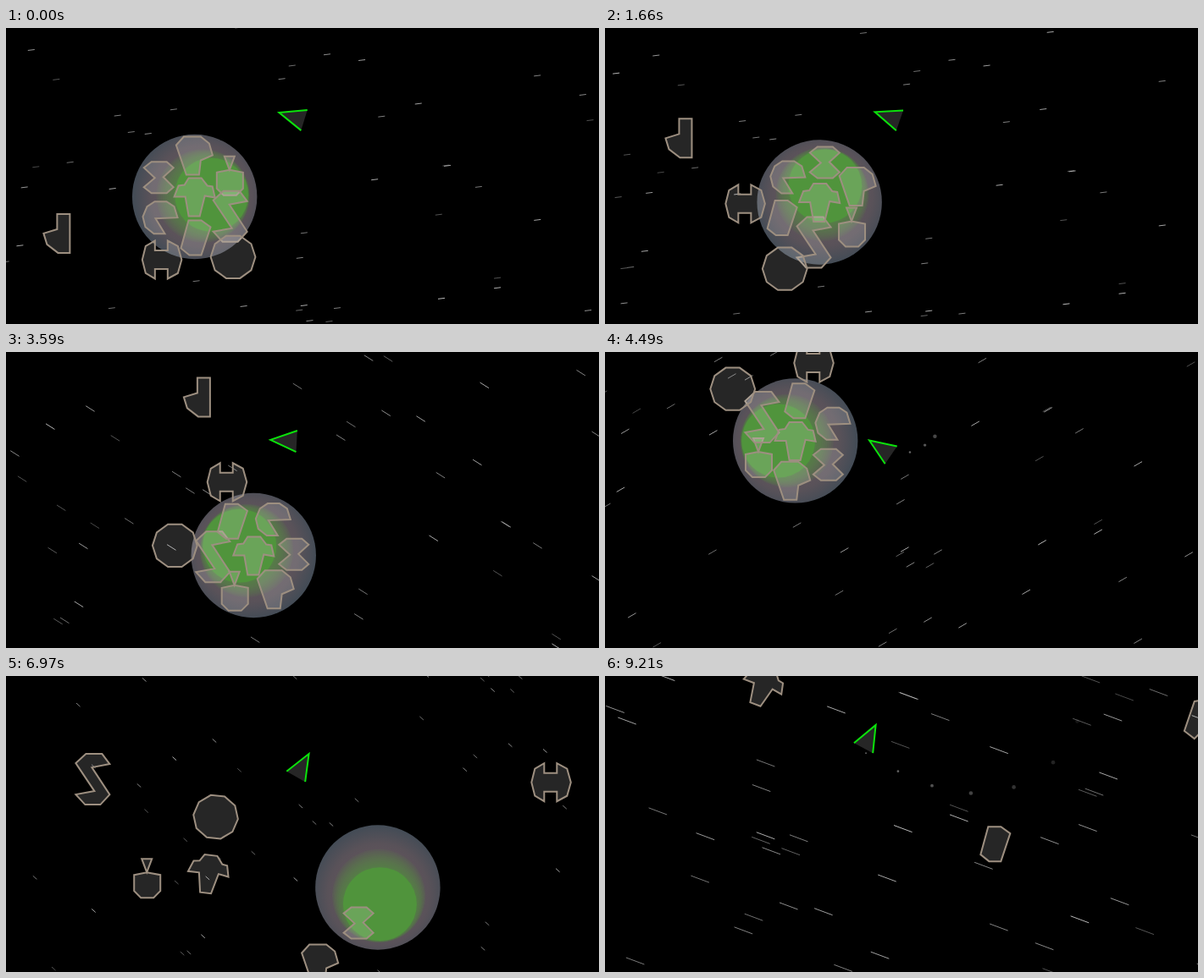
Recreate the animation shown at these times as an HTML page. Size 700 px wide and 350 px high, loop 9.24 s.

```html
<!DOCTYPE html>
<html lang="en">
<head>
<meta charset="utf-8">
<title>Space drift</title>
<style>
  html, body { margin: 0; width: 100%; height: 100%; overflow: hidden; background: #000; }
  svg { display: block; width: 700px; height: 350px; background: #000; }
</style>
</head>
<body>
<svg id="stage" viewBox="0 0 700 350">
  <defs>
    <radialGradient id="shell" gradientUnits="userSpaceOnUse" cx="0" cy="0" r="80">
      <stop offset=".5" stop-color="#62545c"/>
      <stop offset=".75" stop-color="#595259"/>
      <stop offset="1" stop-color="#444c56"/>
    </radialGradient>
  </defs>
  <g id="stars" stroke="#fff"></g>
  <g id="puffs" fill="#fff"></g>
  <g id="planet"><circle r="73.7" fill="url(#shell)"/></g>
  <g id="pieces" fill="#fff" fill-opacity=".15" stroke="#9d8f80" stroke-width="2"></g>
  <g id="ship">
    <path d="M-10.5-12.6 20.5 0-10.5 12.6Z" fill="#fff" fill-opacity=".15"/>
    <path d="M-10.5-12.6 20.5 0-10.5 12.6" fill="none" stroke="#0be30b" stroke-width="2"/>
  </g>
</svg>
<script>
const LOOP = 9240, STEP = 46, RELEASE = 4490;
const RAD = Math.PI / 180;

const el = id => document.getElementById(id);
const lerp = (a, b, u) => a + (b - a) * u;
const mix = (a, b, u) => a.map((v, i) => lerp(v, b[i], u));
const ease = u => u * u * (3 - 2 * u);
const wrap = (v, size) => ((v % size) + size) % size;
const polar = (r, degrees) => [r * Math.cos(degrees * RAD), r * Math.sin(degrees * RAD)];

function set(node, attrs) {
  for (const key in attrs) node.setAttribute(key, attrs[key]);
}
function add(parent, tag, attrs) {
  const node = document.createElementNS('http://www.w3.org/2000/svg', tag);
  set(node, attrs);
  return el(parent).appendChild(node);
}
const repeat = (count, make) => Array.from({ length: count }, (_, i) => make(i));

// Key poses: planet centre, drift of the view per step, ship x, y and heading.
const poses = [
  { t: 0, planet: [222.5, 199.5], drift: [8, -1], ship: [342, 106, 197] },
  { t: 1660, planet: [253, 206], drift: [8, -1], ship: [338, 106, 199] },
  { t: 2590, planet: [378, 285], drift: [10, 4.7], ship: [337, 92, 147] },
  { t: RELEASE, planet: [224.5, 105], drift: [9.5, -5.5], ship: [329, 116, 214] },
  { t: 5880, planet: [322, 147], drift: [6, 2], ship: [344, 102, 212] },
  { t: 8100, planet: [571.5, 211.5], drift: [7, -10], ship: [351, 118, 392] },
  { t: 9210, planet: [800, 60], drift: [21.5, 8], ship: [310, 76, 658] }
];

// The stretch of a timed list that contains t; u may pass 1 after its end.
function stretch(list, t) {
  let i = 0;
  while (i < list.length - 2 && t >= list[i + 1].t) i++;
  const a = list[i], b = list[i + 1];
  return { a, b, u: (t - a.t) / (b.t - a.t) };
}

// Cubic Hermite motion of the view, with its speed per step.
function viewAt(t) {
  const { a, b, u } = stretch(poses, t), n = (b.t - a.t) / STEP;
  const axis = k => {
    const p = a.planet[k], d = b.planet[k] - p, m = a.drift[k] * n, q = b.drift[k] * n;
    const c2 = 3 * d - 2 * m - q, c3 = m + q - 2 * d;
    return [p + u * (m + u * (c2 + u * c3)), (m + u * (2 * c2 + 3 * u * c3)) / n];
  };
  const [x, vx] = axis(0), [y, vy] = axis(1);
  return { x, y, vx, vy };
}

function shipAt(t) {
  const { a, b, u } = stretch(poses, t);
  return mix(a.ship, b.ship, ease(Math.min(u, 1)));
}

const decagon = 'M' + repeat(10, i => polar(26.4, i * 36).map(v => v.toFixed(1)).join(' ')).join('L') + 'Z';

// Six pieces share an evenly spaced ring; "out" holds later offsets from the planet.
const ringPieces = [
  { d: 'M-21-13-12-23 8-23 18-15 22-1 8 5 6 22-9 22Z',
    out: [[-53, 95], [-85, 86], [-96, -7]], spin: { from: 8100, rate: 34 } },
  { d: 'M-6-23 6-23 0-7ZM-15-4 0-7 16-4 16 15 8 23-7 23-15 15Z',
    out: [[-165, 0], [-384, -22], [-860, -30]] },
  { d: 'M-20-19-8-30 11-30 20-18-1-14 20 18 9 30-9 30-20 18 2 14Z',
    out: [[-162, -64], [-517, -194]] },
  { d: 'M-8-20 7-20 18-12 7 21-7 21-17 13Z',
    out: [[198, 253], [-191, 188], [-340, 138]] },
  { d: 'M-20-1-15-13-6-19 8-19 17-13 21 0-5 1 6 19-7 19-17 11Z',
    out: [[200, -210]] },
  { d: 'M-18-11-9-18 9-18 17-11 5 0 17 12 9 19-9 19-18 12-5 1Z',
    out: [[-9, 79], [-36, 3], [-10, -50]] }
].map((piece, i) => ({ ...piece, angle: 269 + 60 * i, rate: 41.5, r: 48, grow: 0 }));

const loosePieces = [
  { d: 'M-24 0-19-13-12-14-7-22 8-22 15-13 21-12 24 1 12-1 6 23-7 23-11 0Z',
    angle: 0, rate: 0, r: 0, grow: 0,
    out: [[-116, -3], [-287, -30], [-614, -48]], spin: { from: 5880, rate: 6.3 } },
  { d: decagon, angle: 57.5, rate: 36.1, r: 84.5, grow: 2.55,
    out: [[-123, -102], [-262, -64], [-585, -105]], spin: { from: 5880, rate: 5 } },
  { d: 'M-23 0-19-16-8-22.5-8-11 7-11 7-22.5 19-16 23.5 0 19 16 7 22.5 7 11-8 11-8 22.5-19 16Z',
    angle: 117.5, rate: 36.9, r: 84, grow: 2.3, out: [[124, -110]] },
  { d: 'M0-23 15-23 15 23 1 23-12 13-16 0 0-5Z',
    angle: 165, rate: 23.8, r: 168, grow: 8.5, out: [[8, -267]] }
];

const orbitAt = (p, t) => polar(p.r + p.grow * t / 1000, p.angle + p.rate * t / 1000);
const flightTimes = poses.filter(pose => pose.t > RELEASE).map(pose => pose.t);
const pieces = [...ringPieces, ...loosePieces].map(p => ({
  ...p,
  node: add('pieces', 'path', { d: p.d }),
  flight: [{ t: RELEASE, at: orbitAt(p, RELEASE) }, ...p.out.map((at, i) => ({ t: flightTimes[i], at }))]
}));

let seed = 90210;
const random = () => (seed = (seed * 16807) % 2147483647) / 2147483647;
const FIELD = [740, 380];
const stars = repeat(52, () => ({
  x: random() * FIELD[0],
  y: random() * FIELD[1],
  node: add('stars', 'line', { 'stroke-opacity': 0.28 + 0.45 * random() })
}));

const RINGS = 9, CORE_R = 43.5, GREEN = '#50943c';
const rings = repeat(RINGS, i => add('planet', 'circle', { r: CORE_R + 1.3 * (RINGS - i), fill: GREEN, 'fill-opacity': 0.1 }));
const core = add('planet', 'circle', { r: CORE_R, fill: GREEN });

const PUFF_GAP = 92;
const burns = [[4150, 4520], [7650, LOOP]];
const puffs = repeat(7, () => add('puffs', 'circle'));
const smoke = repeat(2, i => ({ x: -157 - 11 * i, y: -133 + 18 * i, node: add('puffs', 'circle', { r: 14 }) }));

function drawPlanet(t, view) {
  const [gx, gy] = polar(20, -6 - 38.9 * t / 1000);
  set(el('planet'), { transform: `translate(${view.x} ${view.y})` });
  set(el('shell'), { cx: gx * 0.4, cy: gy * 0.4 });
  rings.forEach((ring, i) => {
    const k = lerp(0.5, 1, i / RINGS);
    set(ring, { cx: gx * k, cy: gy * k });
  });
  set(core, { cx: gx, cy: gy });
}

function drawPieces(t, view) {
  for (const p of pieces) {
    const { a, b, u } = stretch(p.flight, t);
    const [x, y] = t < RELEASE ? orbitAt(p, t) : mix(a.at, b.at, u);
    const turn = p.spin ? Math.max(0, t - p.spin.from) * p.spin.rate / 1000 : 0;
    set(p.node, { transform: `translate(${view.x + x} ${view.y + y}) rotate(${turn})` });
  }
}

function drawStars(view) {
  const dx = view.vx / 2, dy = view.vy / 2;
  for (const star of stars) {
    const x = wrap(star.x + view.x, FIELD[0]) - 20, y = wrap(star.y + view.y, FIELD[1]) - 15;
    set(star.node, { x1: x - dx, y1: y - dy, x2: x + dx, y2: y + dy });
  }
}

// Exhaust stays in the world while the view follows the ship.
function drawPuffs(t, view) {
  const newest = Math.floor(t / PUFF_GAP);
  puffs.forEach((node, i) => {
    const born = (newest - i) * PUFF_GAP, age = t - born;
    if (!burns.some(([from, to]) => born >= from && born <= to)) return set(node, { opacity: 0 });
    const [sx, sy, heading] = shipAt(born), origin = viewAt(born);
    const [bx, by] = polar(14 + age * 0.1, heading);
    set(node, {
      cx: sx - bx + view.x - origin.x,
      cy: sy - by + view.y - origin.y,
      r: 0.8 + Math.min(1.5, age / 180),
      opacity: Math.max(0, 0.45 * (1 - age / 680))
    });
  });
  const glow = Math.max(0, 1 - Math.abs(t - 5850) / 350);
  for (const { x, y, node } of smoke) set(node, { cx: view.x + x, cy: view.y + y, opacity: 0.07 * glow });
}

function draw(t) {
  const view = viewAt(t), [x, y, heading] = shipAt(t);
  drawStars(view);
  drawPuffs(t, view);
  drawPlanet(t, view);
  drawPieces(t, view);
  set(el('ship'), { transform: `translate(${x} ${y}) rotate(${heading})` });
}

const start = performance.now();
function tick() {
  draw((performance.now() - start) % LOOP);
  requestAnimationFrame(tick);
}
tick();
</script>
</body>
</html>
```
